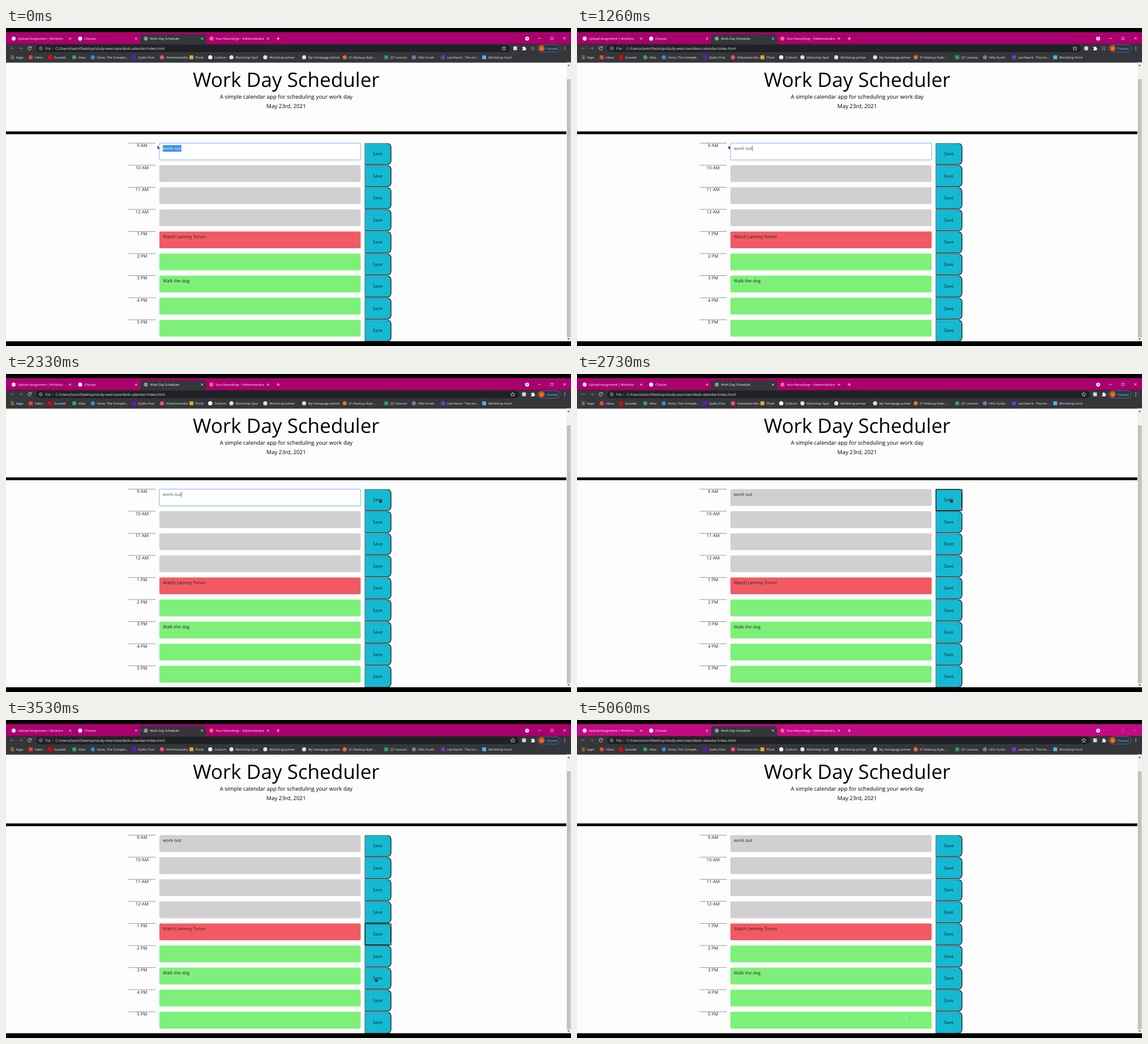
Animation, 960 px wide and 540 px high, one loop 5200 ms. Source, as an HTML page:

```html
<!DOCTYPE html>
<html lang="en">
<head>
<meta charset="utf-8">
<title>Work Day Scheduler</title>
<style>
  html, body { margin: 0; width: 100%; height: 100%; overflow: hidden; background: #000; }
  svg { display: block; width: 960px; height: 540px; }
  text { font-family: "Open Sans", "Noto Sans", sans-serif; white-space: pre; text-rendering: geometricPrecision; }
</style>
</head>
<body>
<svg id="stage" viewBox="0 0 960 540"></svg>
<script>
const LOOP = 5200, FPS = 15;
const ROW_TOP = 195.5, ROW_STEP = 37.5;
const stage = document.getElementById('stage');

// Markup helpers
const rect = (x, y, w, h, fill, extra = '') =>
  `<rect x="${x}" y="${y}" width="${w}" height="${h}" fill="${fill}" ${extra}/>`;
const dot = (x, y, r, fill, extra = '') => `<circle cx="${x}" cy="${y}" r="${r}" fill="${fill}" ${extra}/>`;
const line = (d, color, width = 0.8, extra = '') =>
  `<path d="${d}" fill="none" stroke="${color}" stroke-width="${width}" ${extra}/>`;
const text = (x, y, size, fill, str, extra = '') =>
  `<text x="${x}" y="${y}" font-size="${size}" fill="${fill}" ${extra}>${str}</text>`;
const middle = 'text-anchor="middle"';
const cross = (x, y, r, color) =>
  line(`M${x - r} ${y - r}l${2 * r} ${2 * r}m0 ${-2 * r}l${-2 * r} ${2 * r}`, color);

function tabStrip() {
  const tabs = [
    [13, 'Upload Assignment | Worksho', '#f4dcea', 109],
    [126, 'Choices', '#fff', 221],
    [237.5, 'Work Day Scheduler', '#8f9499', 333],
    [349, 'Your Recordings - Vidremolandra', '#ff6478', 445]
  ];
  return rect(0, 7, 960, 20.5, '#aa006e', 'id="strip"') +
    '<path d="M225 27.5q3 0 3-3v-11q0-3 3-3h106q3 0 3 3v11q0 3 3 3z" fill="#35363a"/>' +
    tabs.map(([x, title, color, close]) =>
      dot(x, 18, 3.4, color) + text(x + 7.3, 20.1, 5.35, '#fff', title) + cross(close, 18, 1.6, '#fff')).join('') +
    line('M459.7 18h5.6m-2.8-2.8v5.6', '#fff') +
    dot(885.5, 18, 3.3, '#fff') + '<path d="M884 17.2h3l-1.5 2z" fill="#80134f"/>' +
    `<g id="controls">${line('M904 17.5h5', '#fff', 0.6) +
      line('M925.5 15.7h4v4h-4z', '#fff', 0.6) + cross(949, 17.5, 2, '#fff')}</g>`;
}

function toolbar() {
  const star = 'M0-3.5l1 2.4 2.6.2-2 1.7.7 2.5L0 1.9l-2.3 1.4.7-2.5-2-1.7 2.6-.2z';
  return rect(0, 27.5, 960, 31, '#35363a') + rect(51, 28.5, 806, 12.5, '#202124', 'rx="6.2" id="omnibox"') +
    line('M13.5 34.5h-6m2.5-2.5l-2.5 2.5 2.5 2.5', '#77797d') +
    line('M22 34.5h6m-2.5-2.5l2.5 2.5-2.5 2.5', '#77797d') +
    line('M42.4 32.6a2.8 2.8 0 1 0 .5 2.6M43 31.2v2.3h-2.3', '#f1f1f1') +
    dot(59, 34.5, 2.6, 'none', 'stroke="#d8d8d8" stroke-width=".7"') + line('M59 34v2m0-3.2v.6', '#d8d8d8', 0.7) +
    text(66.5, 36.7, 6.1, '#d5d6d8', 'File') + line('M79.5 31.5v6', '#6a6c70', 0.6) +
    text(84, 36.7, 6.1, '#f1f1f1', 'C:/Users/tavin/Desktop/study-exercises/desk-calendar/index.html') +
    `<g id="star" transform="translate(846 34.5)">${line(star, '#e8e8e8', 0.7)}</g>` +
    `<g id="extensions">${rect(862, 31.3, 6.4, 6.4, '#d4d6d8', 'rx="1"') +
      '<path d="M877.2 32.4h1.6a1.2 1.2 0 0 1 2.4 0h1.6v1.8a1.2 1.2 0 0 1 0 2.4v1.4h-5.6v-1.5a1.2 1.2 0 0 0 0-2.4z" fill="#f1f1f1"/>'}</g>` +
    `<g id="media">${line('M891.5 32.5h5m-5 2h4m-4 2h2.5', '#85878b', 0.8) +
      dot(896, 36.5, 1.2, '#85878b') + line('M897 36.5v-4h1.5', '#85878b', 0.6)}</g>` +
    rect(903.5, 28.3, 38, 12.5, '#2b3442', 'rx="6.2" stroke="#6389b8" stroke-width=".6"') +
    dot(910.2, 34.5, 5, '#e8590c') + text(910.2, 36.5, 5, '#fff', 'L', middle) +
    text(918.5, 36.5, 5.5, '#8ab4f8', 'Paused') +
    [32, 34.5, 37].map(y => dot(949.5, y, 0.7, '#f1f1f1')).join('');
}

function bookmarks() {
  const items = [
    [42, 'Inbox', '#ea4335', 1], [74.5, 'Zuvotek', '#f00000', 1], [116, 'Atlas', '#34a853'],
    [147.5, 'Vorex, The Complet...', '#3c8dc4'], [217.5, 'Quibo Post', '#6b12d8', 1],
    [265, 'Vidremolandra', '#ff5064'], [315, 'Plonk', '#e2a83b', 1], [347, 'Codrum', '#fff'],
    [383, 'Workshop Spot', '#dfe1e5'], [440.5, 'Workshop primer', '#dfe1e5'],
    [506.5, 'My homepage primer', '#dfe1e5'], [575.5, '01-Markup-Style -...', '#f26a2e'],
    [646, 'Q7 Lessons', '#25a164', 1], [693, 'Hillo Funds', '#767aa8'],
    [742.5, 'Latchwork · The mo...', '#7434d8', 1], [812.5, 'Workshop Fund', '#58b4e8', 1]
  ];
  let out = '';
  const hues = ['#ea4335', '#fbbc05', '#34a853'];
  for (let i = 0; i < 9; i++) out += rect(7.5 + i % 3 * 2.4, 46.6 + Math.floor(i / 3) * 2.4, 1.6, 1.6, hues[i % 3]);
  out += text(17, 51.7, 5.4, '#f1f1f1', 'Apps');
  for (const [x, label, color, square] of items)
    out += (square ? rect(x - 3.3, 46.4, 6.6, 6.6, color, 'rx=".6"') : dot(x, 49.7, 3.5, color)) +
      text(x + 7, 51.7, 5.35, '#f1f1f1', label);
  return out;
}

function row(i) {
  const hours = ['9 AM', '10 AM', '11 AM', '12 AM', '1 PM', '2 PM', '3 PM', '4 PM', '5 PM'];
  const notes = { 4: 'Watch Lemmy Torvin', 6: 'Walk the dog' };
  const fill = i < 4 ? '#d0d0d0' : i === 4 ? '#f15a62' : '#7ef07a';
  const y = ROW_TOP + i * ROW_STEP;
  return line(`M208.5 ${y}H254`, '#333', 0.7, 'stroke-dasharray="1.6 .7"') +
    text(231.2, y + 6.7, 7.5, '#212529', hours[i], middle) +
    rect(260.6, y, 342, 28.6, fill, `rx="2" id="field${i}"`) +
    (notes[i] ? text(266.6, y + 11.6, 7.5, '#212529', notes[i]) : '') +
    `<path d="M609.8 ${y + 0.4}h37.4q7 0 7 7v22q0 7-7 7h-37.4z" fill="#14b9d2" stroke="#665a54" stroke-width=".8"/>` +
    line(`M648.5 ${y + 0.6}q5.6 1 5.6 7v22q0 6.9-7 6.9h-37.3`, '#20262a', 1.1) +
    text(631.6, y + 20.9, 7.5, '#212529', 'Save', middle);
}

stage.innerHTML =
  rect(0, 0, 960, 540, '#000') + rect(0, 58.5, 960, 473.5, '#fdfdfd') +
  tabStrip() + toolbar() + bookmarks() +
  text(476, 100.4, 33.75, '#000', 'Work Day Scheduler', middle) +
  text(476, 119.6, 9.375, '#000', 'A simple calendar app for scheduling your work day', middle) +
  text(476, 136.3, 9.375, '#000', 'May 23rd, 2021', middle) +
  rect(0, 175.6, 952.3, 4.7, '#000') +
  [...Array(9).keys()].map(row).join('') +
  rect(266.4, 199, 31.6, 11, '#3a8fe8', 'id="selection"') +
  text(266.6, ROW_TOP + 11.6, 7.5, '#212529', 'work out', 'id="entry"') +
  rect(0, 200, 0.6, 9, '#222', 'id="caret"') +
  `<g id="ring">${rect(610, 0.5, 44.2, 36.2, 'none', 'stroke="#101010" stroke-width="1.1"') +
    line('M650 1l4 4m0 27l-4 4', '#d9e8ea', 0.6)}</g>` +
  rect(0, 532, 960, 8, '#000') +
  rect(952.3, 58.5, 7.7, 473.5, '#f1f1f1') + rect(953, 87, 6.4, 438, '#c1c1c1') +
  '<path d="M954 64.5h4l-2-2.4zM954 527h4l-2 2.4z" fill="#505050"/>' +
  '<g id="pointer">' +
  '<path id="arrow" d="M-.6-3v5.2l1.2-1 1 2 .8-.4-.9-1.9h1.4z" fill="#26106a"/>' +
  '<g id="hand"><path d="M-1.6-2.6q1-.8 1.4.4l.4 1.6 2 .5q1 .4.7 1.7L2.2 3.4h-3L-2.4.8l1.2-.2z" fill="#1c1238"/>' +
  dot(0.6, 0.8, 1, '#e43d7d') + dot(-0.9, -1.7, 0.5, '#fff') + '</g>' +
  line('M-1.3-3h2.6M0-3v6M-1.3 3h2.6', '#d9efd8', 0.8, 'id="beam"') +
  '</g>';

const el = {};
stage.querySelectorAll('[id]').forEach(node => el[node.id] = node);
const show = (node, on) => node.setAttribute('visibility', on ? 'visible' : 'hidden');

// All times below are ticks of 1/15 s.
const typed = [[6, 0], [8, 1], [10, 2], [11, 3], [13, 4], [15, 5], [16, 6], [18, 7], [19, 8]];
const moves = [
  [26, 258, 203], [33, 636, 215], [42, 636, 215], [47, 632, 365],
  [50, 632, 365], [53, 629, 441], [58, 629, 441], [64, 559.5, 507.5]
];
const clicks = [[37, 0], [48, 4], [55, 6], [74, -1]];
const BLUR = 74, MEDIA_END = 26;

const latest = (table, tick, initial) =>
  table.reduce((value, [start, next]) => tick >= start ? next : value, initial);

function pointerAt(tick) {
  if (tick <= moves[0][0]) return moves[0].slice(1);
  for (let i = 1; i < moves.length; i++) {
    const [t0, x0, y0] = moves[i - 1], [t1, x1, y1] = moves[i];
    if (tick > t1) continue;
    const p = (tick - t0) / (t1 - t0), e = p * p * (3 - 2 * p);
    return [x0 + (x1 - x0) * e, y0 + (y1 - y0) * e];
  }
  return moves[moves.length - 1].slice(1);
}

function draw(ms) {
  const tick = Math.floor(ms * FPS / 1000 + 0.1);
  const count = latest(typed, tick, -1);
  const pressed = latest(clicks, tick, -1);
  const editing = tick < clicks[0][0];
  const selected = count < 0;

  el.entry.textContent = 'work out'.slice(0, selected ? 8 : count);
  el.entry.setAttribute('fill', selected ? '#fff' : editing ? '#495057' : '#212529');
  show(el.selection, selected);
  show(el.caret, editing && !selected);
  el.caret.setAttribute('x', 266.7 + (count > 0 ? el.entry.getComputedTextLength() : 0));
  el.field0.setAttribute('fill', editing ? '#fff' : '#d0d0d0');
  el.field0.setAttribute('stroke', editing ? '#a3cbfb' : 'none');
  el.field0.setAttribute('stroke-width', 1.5);

  show(el.ring, pressed >= 0);
  el.ring.setAttribute('transform', `translate(0 ${ROW_TOP + Math.max(0, pressed) * ROW_STEP})`);

  const playing = tick < MEDIA_END;
  show(el.media, playing);
  el.star.setAttribute('transform', `translate(${playing ? 846 : 861} 34.5)`);
  el.extensions.setAttribute('transform', `translate(${playing ? 0 : 15} 0)`);
  el.omnibox.setAttribute('width', playing ? 806 : 821);

  const [x, y] = pointerAt(tick);
  const overField = x > 260.5 && x < 603 && (y - ROW_TOP) % ROW_STEP < 28.6;
  const overButton = x > 609.5 && x < 654;
  el.pointer.setAttribute('transform', `translate(${x} ${y})`);
  show(el.beam, overField);
  show(el.hand, overButton);
  show(el.arrow, !overField && !overButton);
  el.beam.setAttribute('stroke', y < 230 && editing ? '#444' : '#d9efd8');

  const blurred = tick >= BLUR;
  el.strip.setAttribute('fill', blurred ? '#c20a82' : '#aa006e');
  el.controls.setAttribute('opacity', blurred ? 0.3 : 1);
}

const start = performance.now();
function loop() {
  draw((performance.now() - start) % LOOP);
  requestAnimationFrame(loop);
}
loop();
</script>
</body>
</html>
```
